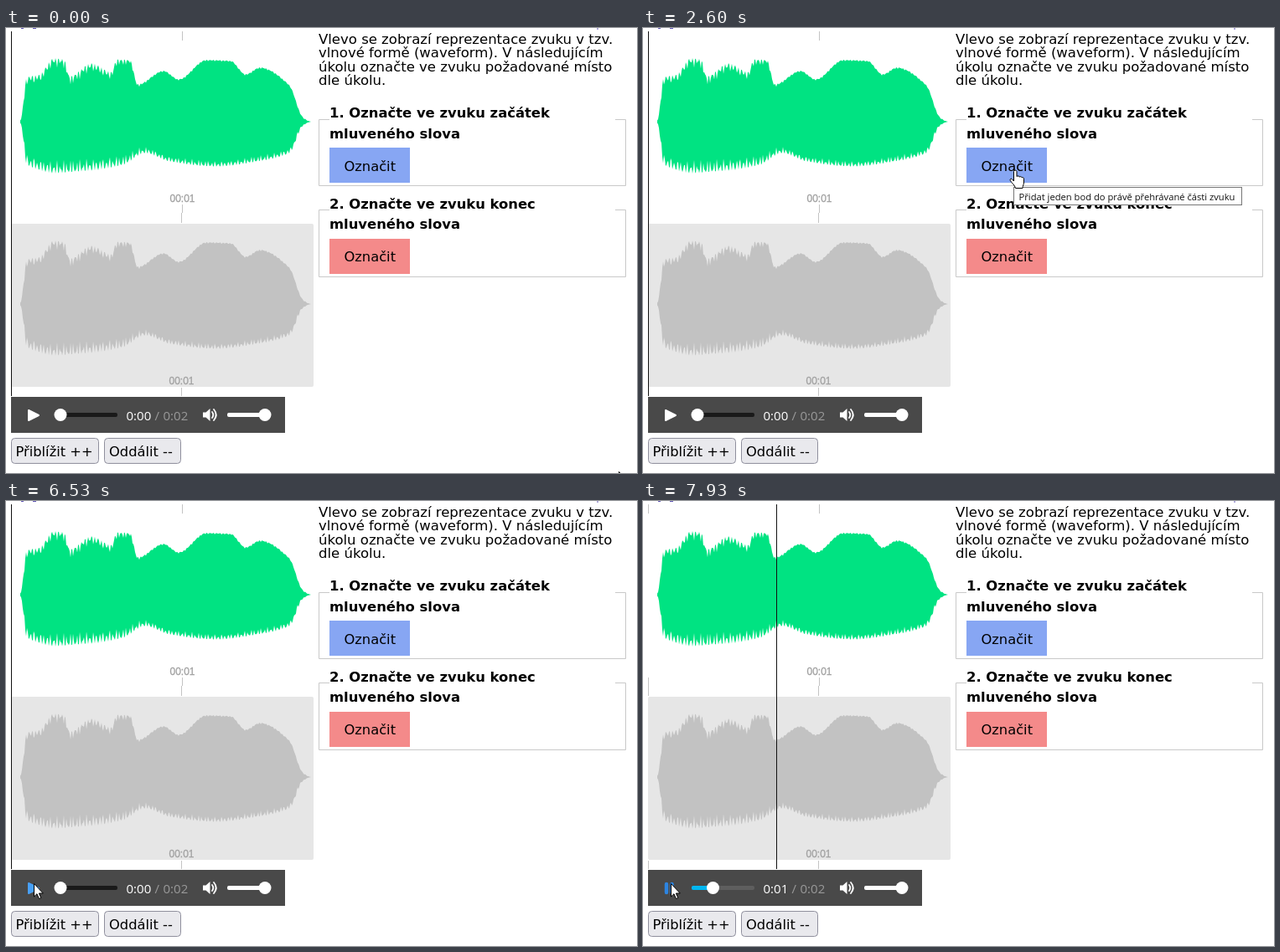
Animation, 753 px wide and 532 px high, one loop 8000 ms. Source, as an HTML page:

```html
<!DOCTYPE html>
<html lang="cs">
<head>
<meta charset="utf-8">
<title>Označení zvuku</title>
<style>
html, body { margin: 0; width: 100%; height: 100%; overflow: hidden; background: #fff; }
svg { display: block; }
text { font: 16.3px "DejaVu Sans", Verdana, sans-serif; white-space: pre; }
.intro { font-size: 16.5px; }
.bold { font-weight: bold; font-size: 16.4px; }
.stamp { font: 12px "Liberation Sans", Arial, sans-serif; fill: #a2a2a2; stroke: #a2a2a2; stroke-width: .3; }
.clock { font: 15px "Open Sans", sans-serif; fill: #fff; }
.total { fill: #999; }
.tip { font: 11.2px "Open Sans", sans-serif; fill: #111; }
.frame { fill: none; stroke: #c9c9c9; }
.tick { stroke: #c4c4c4; }
.button { fill: #e9e9ed; stroke: #8f8f9d; }
.pointer { fill: #fff; stroke: #000; stroke-linejoin: round; }
</style>
</head>
<body>
<svg width="753" height="532" viewBox="0 0 753 532">
  <path d="M18 .5h3M32 .5h4M705 1h2" stroke="#6257b5" fill="none"/>

  <path id="wave" fill="#00e382"/>
  <rect x="6" y="234" width="361" height="195" rx="2" fill="#e6e6e6"/>
  <path id="greyWave" fill="#c2c2c2" transform="translate(0 218)"/>
  <path class="tick" d="M6.5 4v11M6.5 211v22M6.5 430v10M210.5 4v11M210.5 211v10M209.5 221v12M209.5 430v10"/>
  <text class="stamp" x="195.5" y="208">00:01</text>
  <text class="stamp" x="194.5" y="426">00:01</text>
  <path id="playhead" d="M.5 4V440" stroke="#111"/>

  <text class="intro" x="373" y="18.5">Vlevo se zobrazí reprezentace zvuku v tzv.</text>
  <text class="intro" x="373" y="34.5">vlnové formě (waveform). V následujícím</text>
  <text class="intro" x="373" y="51.5">úkolu označte ve zvuku požadované místo</text>
  <text class="intro" x="373" y="67.5">dle úkolu.</text>

  <path class="frame" d="M386 109.5H373.5V188.5H739.5V109.5H727"/>
  <text class="bold" x="386" y="107">1. Označte ve zvuku začátek</text>
  <text class="bold" x="386" y="132">mluveného slova</text>
  <rect x="386" y="143" width="96" height="42" fill="#87a6f3"/>
  <text x="403.5" y="171">Označit</text>

  <path class="frame" d="M386 217.5H373.5V297.5H739.5V217.5H727"/>
  <text class="bold" x="386" y="216">2. Označte ve zvuku konec</text>
  <text class="bold" x="386" y="240">mluveného slova</text>
  <rect x="386" y="252" width="96" height="42" fill="#f48a8a"/>
  <text x="403.5" y="279">Označit</text>

  <rect x="6" y="441" width="327" height="43" fill="#494949"/>
  <path id="play" d="M27 457v12l12-6z" stroke-width="2" stroke-linejoin="round"/>
  <path id="pause" d="M28 458v10M34.5 458v10" stroke-width="4.5" stroke-linecap="round"/>
  <rect id="track" x="58" y="460" width="75" height="5" rx="2"/>
  <rect id="played" x="58" y="460" height="5" rx="2" fill="#00b6f0"/>
  <circle id="knob" cy="462.5" r="7.5"/>
  <text id="clock" class="clock" x="143.5" y="469">0:00</text>
  <text class="clock total" x="177.5" y="469">/</text>
  <text class="clock total" x="187.5" y="469">0:02</text>
  <path d="M235 459.5h3.5l5-4.5v15l-5-4.5H235z" fill="#fff"/>
  <path d="M246 459q2.5 3.5 0 7M248 456q5.5 6.5 0 13" fill="none" stroke="#fff" stroke-width="1.8" stroke-linecap="round"/>
  <rect x="264" y="460" width="50" height="5" rx="2" fill="#fff"/>
  <circle cx="309" cy="462.5" r="7.5" fill="#fff"/>

  <rect class="button" x="6.5" y="490.5" width="104" height="30" rx="4"/>
  <text x="11.5" y="512">Přiblížit ++</text>
  <rect class="button" x="117.5" y="490.5" width="91" height="30" rx="4"/>
  <text x="123" y="512">Oddálit --</text>

  <g id="tooltip">
    <rect x="442.5" y="190.5" width="272" height="21" fill="#fff" stroke="#767676"/>
    <text class="tip" x="448.5" y="206">Přidat jeden bod do právě přehrávané části zvuku</text>
  </g>
  <path id="arrow" class="pointer" d="M.5 .5V16L4 12.7L6.5 18.5L8.8 17.5L6.4 12H11.3z"/>
  <path id="hand" class="pointer" d="M-.5 13V1.5a1.8 1.8 0 0 1 3.5 0V7.5c1-1 3-.8 3.2.6c1-.9 2.6-.5 2.9.7c1-.5 2.4 0 2.4 1.4V15c0 2-1.5 3.5-1.5 6.5H1.5C1 18-3 15.5-4.8 12.2c-.8-1.6 1.2-2.6 2.3-1.4z"/>
</svg>
<script>
const $ = id => document.getElementById(id);
const LOOP = 8000, STEP = 1000 / 15;

// Smooth curve through points [at, value...] that never overshoots them
function curve(points, at, col = 1) {
  const last = points.length - 1;
  if (at <= points[0][0]) return points[0][col];
  if (at >= points[last][0]) return points[last][col];
  const slope = i => i < 0 || i >= last ? 0
    : (points[i + 1][col] - points[i][col]) / (points[i + 1][0] - points[i][0]);
  const tangent = i => {
    const a = slope(i - 1), b = slope(i);
    return a * b > 0 ? 2 * a * b / (a + b) : 0;
  };
  const i = points.findIndex(p => p[0] > at) - 1;
  const span = points[i + 1][0] - points[i][0];
  const p = (at - points[i][0]) / span, q = 1 - p;
  return points[i][col] * q * q * (1 + 2 * p) + points[i + 1][col] * p * p * (3 - 2 * p)
    + span * p * q * (tangent(i) * q - tangent(i + 1) * p);
}

// Loudness above and below the middle line: x, height
const upper = [[17, 2], [25, 54], [40, 57], [57, 76], [69, 75], [76, 55], [102, 70], [126, 60], [132, 75],
  [148, 74], [157, 45], [188, 61], [206, 51], [239, 74], [268, 73], [286, 57], [303, 65], [338, 44], [354, 6], [365, 0]];
const lower = [[17, 2], [25, 53], [62, 62], [100, 59], [138, 53], [166, 38], [195, 48],
  [250, 54], [300, 48], [338, 38], [354, 6], [365, 0]];

// Teeth are deep in the loud start and fade to the right
function edge(points, sign, deep, shallow) {
  const line = [];
  for (let x = 17; x <= 365; x++) {
    const h = curve(points, x);
    const fade = 1 / (1 + Math.exp((x - 145) / 8));
    const notch = (shallow + (deep - shallow) * fade) * Math.sin(x * .8) ** 2 * (.65 + .35 * Math.sin(x * 2.3));
    line.push(`${x} ${(112 + sign * (h - Math.min(notch, h * .3))).toFixed(1)}`);
  }
  return line;
}

const shape = "M" + [...edge(upper, -1, 12, 2), ...edge(lower, 1, 17, 8).reverse()].join("L") + "z";
for (const id of ["wave", "greyWave"]) $(id).setAttribute("d", shape);

// Mouse stops: time, x, y
const stops = [[133, 731, 530], [933, 691, 295], [1133, 691, 295], [1733, 511, 180], [2000, 443, 170],
  [5066, 443, 170], [5133, 437, 190], [5933, 76, 445], [6333, 32, 455], [6466, 32, 455], [6533, 33, 457]];

const show = (id, on) => { $(id).style.display = on ? "" : "none"; };
const set = (id, name, value) => $(id).setAttribute(name, value);

function draw(now) {
  // The picture advances 15 times a second
  const t = Math.floor((now % LOOP) / STEP + .08) * STEP;
  const during = (from, to = Infinity) => t > from - 10 && t < to - 10;

  const x = Math.round(curve(stops, t, 1)), y = Math.round(curve(stops, t, 2));
  const pointing = during(2000, 5130);
  show("hand", pointing);
  show("arrow", !pointing);
  set(pointing ? "hand" : "arrow", "transform", `translate(${x} ${y})`);
  show("tooltip", during(2600, 5200));

  const playing = during(7270);
  const head = playing ? Math.round(12 + (t - 7267) * .22) : 6;
  set("playhead", "transform", `translate(${head} 0)`);

  const pressed = during(6930, 7070) || during(7930);
  const paint = pressed ? "#2d84e0" : during(6200) ? "#48a0f7" : "#fff";
  const pausable = during(7070);
  show("play", !pausable);
  show("pause", pausable);
  set("play", "fill", paint);
  set("play", "stroke", paint);
  set("pause", "stroke", paint);

  const halfway = during(7730);
  const knob = halfway ? 83.5 : during(7400) ? 66 : 65;
  set("track", "fill", playing ? "#5e5e5e" : "#1a1a1a");
  set("played", "width", playing ? knob - 58 : 0);
  set("knob", "cx", knob);
  set("knob", "fill", during(5930, 6130) ? "#48a0f7" : "#fff");
  $("clock").textContent = halfway ? "0:01" : "0:00";
}

let start;
function tick(now) {
  start ??= now;
  draw(now - start);
  requestAnimationFrame(tick);
}
draw(0);
requestAnimationFrame(tick);
</script>
</body>
</html>
```
